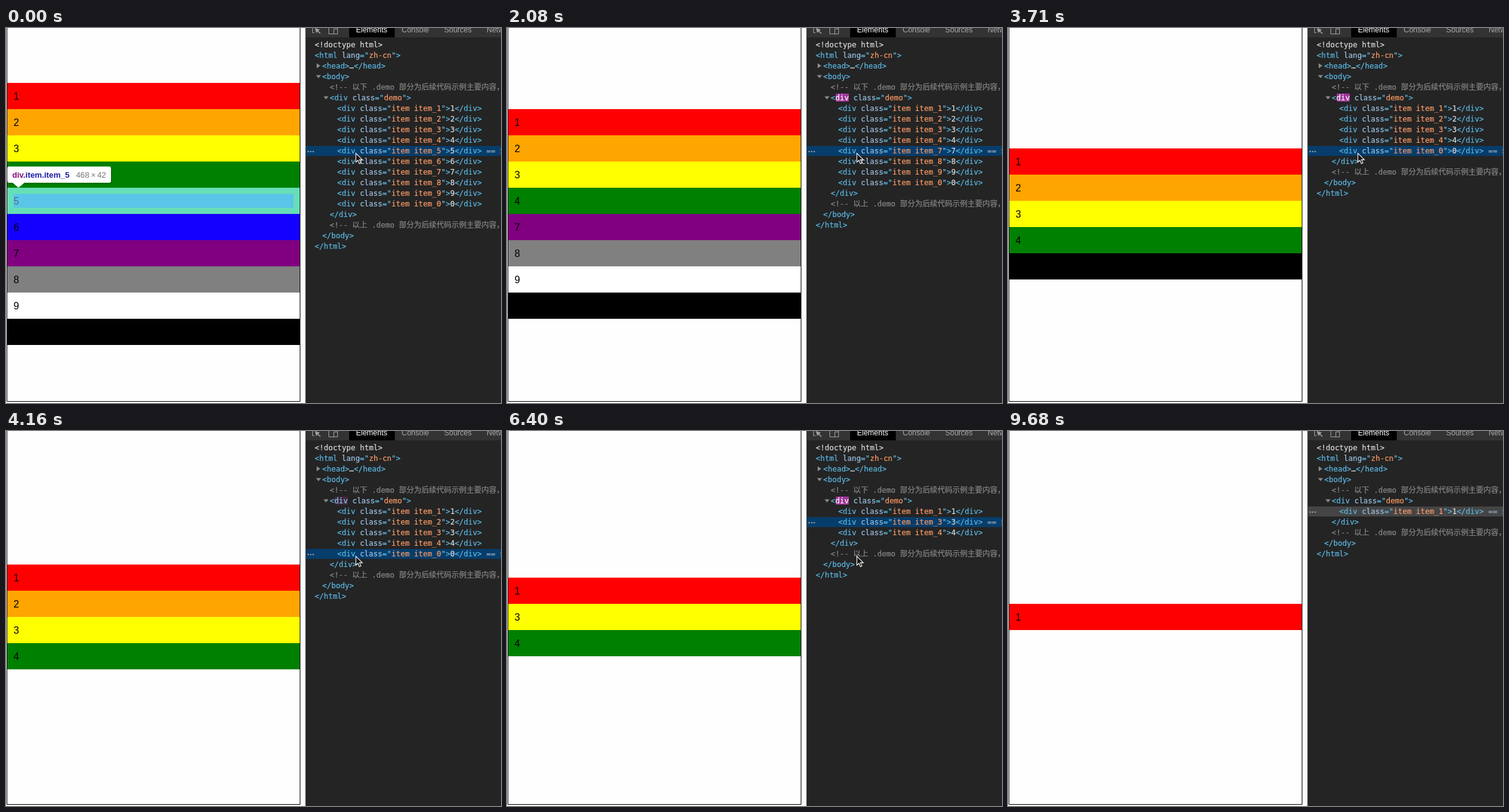
Animation, 792 px wide and 601 px high, one loop 9780 ms. Source, as an HTML page:

```html
<!DOCTYPE html>
<html lang="zh-cn">
<head>
<meta charset="utf-8">
<style>
html, body { margin: 0; width: 100%; height: 100%; overflow: hidden; background: #fefefe; }
svg { display: block; width: 792px; height: 601px; }
text { white-space: pre; }
.page { font: 16px "Liberation Sans", Arial, sans-serif; fill: #000; }
.tip { font: 12.8px "Liberation Sans", Arial, sans-serif; }
.name { font-weight: 700; }
.tab { font: 12px "Liberation Sans", Arial, sans-serif; fill: #a8a8a8; }
.tab .active { fill: #fff; }
.tree { font: 12px "DejaVu Sans Mono", "Noto Sans CJK SC", "Noto Sans CJK", monospace; color: #5cb8e4; }
.tree text { fill: currentColor; stroke: currentColor; stroke-width: .2; }
.attr { color: #9dc3e6; }
.value { color: #fb9c68; }
.plain { color: #dcdcdc; }
.note { color: #898989; }
.ref { color: #8ba0b2; }
</style>
</head>
<body>
<svg viewBox="0 0 792 601">
  <rect width="480" height="601" fill="#fefefe"/>
  <g id="page"></g>
  <path d="M1.5 0V598.5H470.5V0" fill="none" stroke="#000"/>
  <g id="tip"></g>
  <rect x="479" width="1" height="601" fill="#4a4a4a"/>
  <rect x="480" width="312" height="601" fill="#242424"/>
  <rect x="480" width="312" height="15" fill="#333"/>
  <rect x="549" width="73" height="15" fill="#000"/>
  <g fill="none" stroke="#a0a0a0">
    <path d="M490.5 0V7.5H493.5"/>
    <path d="M498 4L503 9" stroke-width="1.6"/>
    <path d="M494 0L502 2.5L496.5 8Z" fill="#a0a0a0" stroke="none"/>
    <path d="M516.5 0V9.5H530.5V0M524.5 9.5V1.5H530.5"/>
  </g>
  <g class="tab">
    <text class="active" x="560" y="6.5">Elements</text>
    <text x="633" y="6.5">Console</text>
    <text x="701" y="6.5">Sources</text>
    <text x="769" y="6.5">Network</text>
  </g>
  <g id="tree" class="tree"></g>
  <path id="cursor" d="M0 0V14.2L3.3 11.2L5.6 16.6L8.1 15.5L5.8 10.3H10.3Z" fill="#111" stroke="#fff" stroke-width="1.1"/>
</svg>
<script>
const LOOP = 9780, ITEM = 42, MIDDLE = 298, ROW = 17;
const COLORS = ['#000', '#f00', '#ffa500', '#ff0', '#008000', '#32ffff', '#1400ff', '#800080', '#808080', '#fff'];

// Runs of evenly spaced repaints: first, last, count
const RUNS = [
  [0, 0, 1], [1350, 2380, 8], [2530, 3420, 7], [3710, 4610, 7], [4760, 4760, 1],
  [5060, 5200, 2], [5500, 5500, 1], [6400, 6850, 4], [7150, 8190, 8], [8340, 8930, 5], [9680, 9680, 1]
];
const ticks = RUNS.flatMap(([a, b, n]) =>
  Array.from({ length: n }, (_, i) => Math.floor((a + (n > 1 ? (b - a) * i / (n - 1) : 0)) / 10) * 10));

// time, items on the page, selected item, inspected item, items in the tree
const STATES = [
  [0, '1234567890', 5, 5],
  [1350, '123467890', 6],
  [2080, '12347890', 7],
  [2530, '1234890', 8],
  [2970, '123490', 9],
  [3710, '12340', 0],
  [4160, '1234', 0, null, '12340'],
  [4310, '1234', 4],
  [5060, '1234', 3, 3],
  [5200, '1234', 2, 2],
  [6400, '134', 3],
  [7150, '14', 4],
  [7740, '1', 1]
];
const FLASHES = [1350, 2080, 2530, 2970, 3710, 4310, 6400, 7150, 7740];
const CURSOR = [[0, 559, 200], [8480, 563, 206], [8630, 600, 290], [8780, 692, 501], [8930, 700, 700]];

const $ = id => document.getElementById(id);
const last = (list, t, key = v => v) => list.filter(v => key(v) <= t).pop();
const first = v => v[0];
const rect = (x, y, w, h, fill, more = '') =>
  `<rect x="${x}" y="${y}" width="${w}" height="${h}" fill="${fill}" ${more}/>`;
const span = (cls, s) => `<tspan class="${cls}">${s}</tspan>`;
const tag = s => `&lt;${s}&gt;`;
const attr = (name, value) =>
  ` ${span('attr', name)}="${span('value', value)}"`;
const note = word => span('note', `&lt;!-- ${word} .demo 部分为后续代码示例主要内容，`);
const mix = (a, b, k) => `rgb(${a.map((v, i) => Math.round(v + (b[i] - v) * k))})`;

function drawPage(items, shown) {
  const top = MIDDLE - items.length * ITEM / 2;
  let out = '', tip = '';
  [...items].forEach((n, i) => {
    const y = top + i * ITEM;
    out += rect(2, y, 468, ITEM, COLORS[n]) + `<text class="page" x="12" y="${y + 27}">${n}</text>`;
    if (+n !== shown) return;
    out += `<path d="M2 ${y}h468v42h-468zM12 ${y + 10}v22h448v-22z" fill="rgba(147,196,125,.55)"/>`
      + rect(12, y + 10, 448, 22, 'rgba(111,168,220,.66)');
    tip = rect(2, y - 33, 168, 28, '#000', 'rx="4" opacity=".12"')
      + rect(2, y - 34, 166, 26, '#fff', 'rx="3"')
      + `<path d="M10 ${y - 8.5}H30L20 ${y}Z" fill="#fff"/>`
      + `<text class="tip name" x="10" y="${y - 16}" fill="#1a1aa6">`
      + `<tspan fill="#881280">div</tspan>.item.item_${n}</text>`
      + `<text class="tip" x="112" y="${y - 16}" fill="#777">468\u2009×\u200942</text>`;
  });
  $('page').innerHTML = out;
  $('tip').innerHTML = tip;
}

function drawTree(items, selected, flash, focused) {
  let out = '', row = 0;
  const mid = () => 27 + ROW * row;
  const line = (x, s) => {
    out += `<text x="${x}" y="${mid() + 4}">${s}</text>`;
    row++;
  };
  const arrow = x => out += `<path d="M${x} ${mid() - 2.5}h8l-4 5z" fill="#8a8a8a"/>`;

  line(494, span('plain', '&lt;!doctype html&gt;'));
  line(494, tag('html' + attr('lang', 'zh-cn')));
  out += `<path d="M497 ${mid() - 4.5}v8l6-4z" fill="#8a8a8a"/>`;
  line(506, tag('head') + span('plain', '…') + tag('/head'));
  arrow(496);
  line(506, tag('body'));
  line(518, note('以下'));
  arrow(508);
  if (flash > 0) out += rect(526, mid() - 7, 21, 13, mix([36, 36, 36], [158, 54, 153], flash), 'rx="1"');
  const ink = mix([92, 184, 228], [255, 255, 255], flash);
  line(518, tag(`<tspan style="color:${ink}">div</tspan>` + attr('class', 'demo')));
  for (const n of items) {
    let tail = '';
    if (+n === selected) {
      out += rect(480, mid() - 8, 312, 16, focused ? '#063d6b' : '#454545');
      for (const x of [483.5, 487.5, 491.5])
        out += `<circle cx="${x}" cy="${mid() + 1}" r="1.2" fill="#91a0ae"/>`;
      tail = span('ref', ' == $0');
    }
    line(530, tag('div' + attr('class', `item item_${n}`)) + span('plain', n) + tag('/div') + tail);
  }
  line(518, tag('/div'));
  line(518, note('以上'));
  line(506, tag('/body'));
  line(494, tag('/html'));
  $('tree').innerHTML = out;
}

function draw(t) {
  const [, page, selected, shown, tree = page] = last(STATES, t, first);
  const age = (t - (last(FLASHES, t) ?? -LOOP)) / 1120;
  drawPage(page, shown);
  drawTree(tree, selected, Math.max(0, 1 - age) ** 2.7, t < 9680);
  const [, x, y] = last(CURSOR, t, first);
  $('cursor').setAttribute('transform', `translate(${x + .8} ${y + .8})`);
}

let start = null, shownTick = -1;
function frame(now) {
  start ??= now;
  const tick = last(ticks, Math.max(0, now - start) % LOOP);
  if (tick !== shownTick) draw(shownTick = tick);
  requestAnimationFrame(frame);
}
draw(0);
requestAnimationFrame(frame);
</script>
</body>
</html>
```
